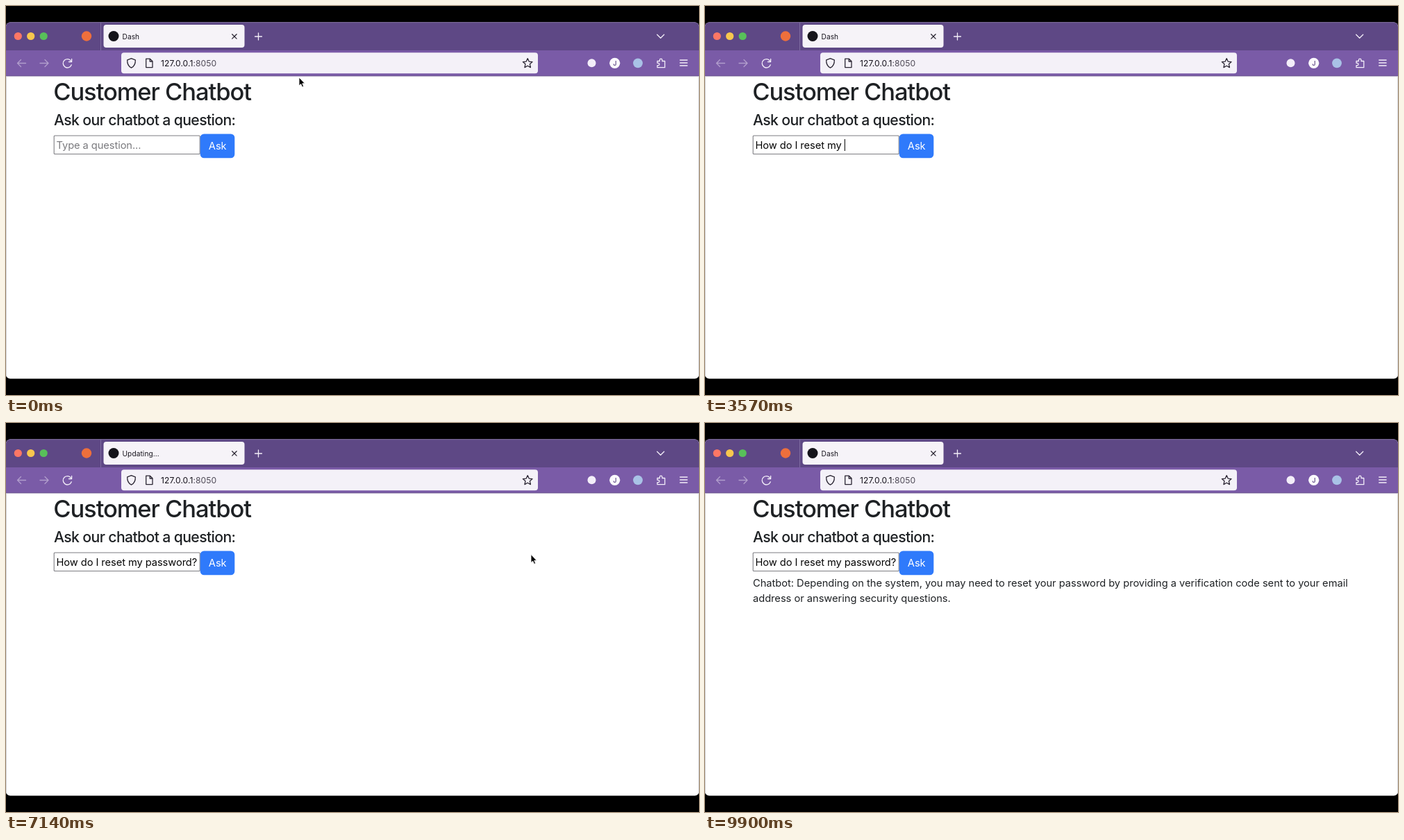
Animation of 998x561 px, one loop 9.95 s. Source, as an HTML page:

```html
<!DOCTYPE html>
<html lang="en">
<head>
<meta charset="utf-8">
<title>Customer Chatbot</title>
<style>
  html, body { margin: 0; width: 100%; height: 100%; overflow: hidden; background: #000; }
  svg { display: block; width: 998px; height: 561px; }
  text { font-family: Inter, "Open Sans", sans-serif; font-size: 14.67px; letter-spacing: -.02px;
         font-optical-sizing: none; fill: #1e2124; white-space: pre; }
  .h1 { font-size: 34.5px; font-weight: 500; letter-spacing: -1.06px; }
  .h4 { font-size: 21.2px; font-weight: 500; letter-spacing: -.62px; }
  .field { letter-spacing: -.07px; }
  .tab { font-size: 10.1px; letter-spacing: .1px; fill: #15121b; }
  .url { font-size: 12.1px; letter-spacing: .05px; fill: #15121b; }
  .line { fill: none; stroke-width: 1.3; stroke-linecap: round; stroke-linejoin: round; }
  .light { stroke: #f3eef9; }
  .dark { stroke: #2b2633; }
</style>
</head>
<body>
<svg viewBox="0 0 998 561" xmlns="http://www.w3.org/2000/svg">
  <defs>
    <clipPath id="frame"><rect y="23.5" width="998" height="514" rx="6"/></clipPath>
  </defs>
  <rect width="998" height="561" fill="#000"/>
  <g clip-path="url(#frame)">
    <rect y="23" width="998" height="515" fill="#fff"/>
    <rect y="23" width="998" height="41" fill="#5e4885"/>
    <rect y="23" width="998" height="1.2" fill="#7d6a9f"/>
    <rect y="64" width="998" height="37" fill="#7a5ba7"/>
    <rect y="100.4" width="998" height="1" fill="#6d568f"/>
    <path d="M.5 102V538M997.5 102V538" stroke="#d4d4d6"/>

    <!-- tab strip -->
    <circle cx="17.3" cy="43.5" r="5.6" fill="#fe7765"/>
    <circle cx="35.7" cy="43.5" r="5.6" fill="#f8c74e"/>
    <circle cx="54.2" cy="43.5" r="5.6" fill="#58c05a"/>
    <circle cx="116" cy="43.5" r="7.2" fill="#ee6f3c"/>
    <path d="M136.5 24V64" stroke="#806ca2"/>
    <rect x="140.5" y="27" width="203" height="33" rx="4" fill="#f6f3f8"/>
    <circle cx="155" cy="43.5" r="7.5" fill="#15141a"/>
    <text class="tab" id="tab" x="167.5" y="47.8">Dash</text>
    <path class="line dark" d="M325.7 40.7l6.4 6.4m0-6.4l-6.4 6.4"/>
    <path class="line light" d="M358.5 44h10M363.5 39v10M937.7 41.2l5 5 5-5"/>

    <!-- toolbar -->
    <g class="line light">
      <path opacity=".45" d="M28.5 82.5H16.5m5-5l-5 5 5 5M49 82.5h12m-5-5l5 5-5 5"/>
      <path d="M94 80a6.2 6.2 0 1 0 .3 4.8M94.6 76.5v4h-4.1"/>
      <path d="M970.7 78h10.4M970.7 82h10.4M970.7 86h10.4"/>
      <path d="M938 79.5h3.4v-1.6a1.8 1.8 0 0 1 3.6 0v1.6h3.8v9.2H938v-3h1.3a1.7 1.7 0 0 0 0-3.4H938z"/>
    </g>
    <circle cx="843.5" cy="82.3" r="6" fill="#f3eef9"/>
    <circle cx="876.7" cy="82.3" r="7.6" fill="#fbfafd"/>
    <text x="874.3" y="85.7" style="font-size:9px;font-weight:600;fill:#67518b">J</text>
    <circle cx="910" cy="82.3" r="6.9" fill="#a9c2e6"/>
    <rect x="166" y="67.3" width="600" height="29.9" rx="4" fill="#f4f1f8"/>
    <g class="line dark">
      <path d="M180.5 75.6l5.8 2.2c.3 5.4-1.6 9.3-5.8 11.4-4.2-2.1-6.1-6-5.8-11.4z"/>
      <path d="M201.7 76.2h5.7l3.6 3.6v8.8h-9.3zM207.2 76.4v3.6h3.6"/>
      <path id="star"/>
    </g>
    <text class="url" x="223" y="87">127.0.0.1<tspan fill="#4d4955">:8050</tspan></text>

    <!-- page -->
    <text class="h1" x="68.2" y="136">Customer Chatbot</text>
    <text class="h4" x="69" y="172">Ask our chatbot a question:</text>
    <rect x="69.2" y="187" width="210" height="26.5" rx="1" fill="#fff" stroke="#7d7d82" stroke-width="1.1"/>
    <text class="field" id="field" x="72.5" y="206" xml:space="preserve"></text>
    <rect id="caret" y="192" width="1.1" height="17" fill="#111"/>
    <rect id="button" x="279.7" y="184.5" width="49.6" height="34.8" rx="5.5"/>
    <text x="291.8" y="207.3" style="fill:#fff">Ask</text>
    <g id="answer">
      <text x="69" y="236">Chatbot: Depending on the system, you may need to reset your password by providing a verification code sent to your email</text>
      <text x="69" y="258">address or answering security questions.</text>
    </g>

    <g id="pointer">
      <path id="arrow" d="M0 0V12l2.7-2.4 1.9 4.3 2-.9-1.8-4.2h3.6z" fill="#000" stroke="#fff" stroke-width=".9"/>
      <path id="beam" d="M-2.5-8q2.5 0 2.5 2V6q0 2-2.5 2M2.5-8Q0-8 0-6V6q0 2 2.5 2" fill="none" stroke="#222" stroke-width="1.1"/>
      <path id="hand" d="M-1.3 8V.9a1.2 1.2 0 0 1 2.4 0v4.3q1.4-.8 2.1.3 1.4-.6 2 .5 1.7-.3 1.7 1.2v2.6q0 2.2-1.4 3.2v1.5H-.6v-1.3l-3.2-4.2q-.7-1.5.7-1.7z" fill="#fff" stroke="#000" stroke-width=".9"/>
    </g>
  </g>
</svg>
<script>
const LOOP = 9950;
const $ = id => document.getElementById(id);
const show = (id, on) => $(id).setAttribute('visibility', on ? 'visible' : 'hidden');
const within = (t, spans) => spans.some(([a, b]) => t >= a && t < b);

// start, ms per key, keys ('<' deletes)
const keys = [
  [1190, 0, 'H'], [1950, 190, 'ow'], [2290, 380, ' d'],
  [2810, 59, 'o I reset my pass'], [3810, 110, 'word'],
  [4330, 720, '/<'], [5330, 0, '?']
];
const caretOn = [[620, 1000], [1190, 1760], [1950, 4900], [5050, 5190], [5330, 5980]];

// time, x, y
const path = [
  [50, 422, 103], [430, 150, 200], [5480, 175, 200], [5680, 236, 240],
  [5930, 293.5, 200], [6330, 293.5, 200], [6710, 541, 203], [6860, 560, 202],
  [7140, 756, 189.5], [7330, 804.5, 192.5], [9430, 804.5, 192.5], [9850, 905, 5]
];

function typed(t) {
  let s = '';
  for (const [start, step, run] of keys)
    [...run].forEach((c, i) => {
      if (t >= start + i * step) s = c === '<' ? s.slice(0, -1) : s + c;
    });
  return s;
}

function pointerAt(t) {
  const i = path.findIndex(p => p[0] > t);
  if (i === 0) return path[0].slice(1);
  if (i < 0) return path[path.length - 1].slice(1);
  const [t0, x0, y0] = path[i - 1], [t1, x1, y1] = path[i];
  const k = (t - t0) / (t1 - t0), e = k * k * (3 - 2 * k);
  return [x0 + (x1 - x0) * e, y0 + (y1 - y0) * e];
}

function draw(t) {
  const text = typed(t), field = $('field');
  field.textContent = text || 'Type a question...';
  field.style.fill = text ? '#050505' : '#7a7a7e';
  $('caret').setAttribute('x', 72.6 + (text ? field.getComputedTextLength() : 0));
  show('caret', within(t, caretOn));

  const [x, y] = pointerAt(t);
  const hover = x > 280 && x < 329 && y > 185 && y < 219;
  const overField = x > 70 && x < 279 && y > 187 && y < 213;
  const visible = !within(t, [[1190, 5480], [9850, LOOP]]);
  $('pointer').setAttribute('transform', `translate(${x} ${y})`);
  show('arrow', visible && !hover && !overField);
  show('beam', visible && overField);
  show('hand', visible && hover);
  $('button').setAttribute('fill', hover ? '#2365d8' : '#2f7afb');

  $('tab').textContent = within(t, [[6090, 7330]]) ? 'Updating...' : 'Dash';
  show('answer', t >= 7330);
}

$('star').setAttribute('d', 'M' + Array.from({ length: 10 }, (_, i) => {
  const a = i * Math.PI / 5, r = i % 2 ? 3.4 : 7.2;
  return `${751.2 + r * Math.sin(a)} ${82.8 - r * Math.cos(a)}`;
}).join('L') + 'Z');

const began = performance.now();
function tick() {
  draw((performance.now() - began) % LOOP);
  requestAnimationFrame(tick);
}
tick();
</script>
</body>
</html>
```
